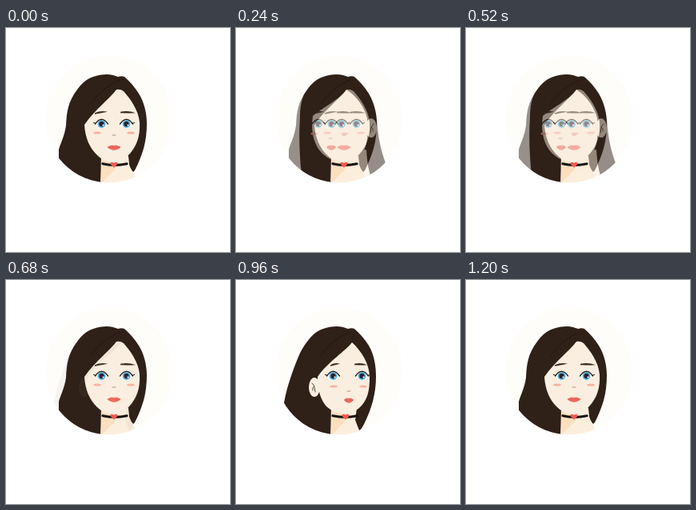
An HTML page with a canvas that plays this animation: 280x280 px, repeating every 1880 ms.

```html
<!DOCTYPE html>
<html lang="en">
<head>
<meta charset="utf-8">
<title>Looking around</title>
<style>
  html, body { margin: 0; width: 100%; height: 100%; overflow: hidden; background: #fff; }
  canvas { display: block; }
</style>
</head>
<body>
<canvas id="stage" width="280" height="280"></canvas>
<script>
const SIZE = 280, LOOP = 1880, STEP = 40;
const HAIR = '#2f2018', SKIN = '#f9eee0', BODY = '#fbeedd', PEACH = '#fbdfbf', RED = '#f4574d';

// Shared top of the hair, from the left temple to the right one.
const CROWN = 'M89 77C94 70 100 64 109 61C117 58 127 57 134 59L140 61C143 60 146 60 148 61C155 67 161 74 166 82';

const poses = {
  front: {
    hair: CROWN + 'C173 93 176 107 176 119C176 142 171 158 161 178L159 180Q153 174 153 162L120 165L118 200H66V152C68 144 73 136 75 122C76 105 77 93 89 77Z',
    body: 'M119 160H153L154 172L162 187L156 200H118Z',
    face: 'M138 77C130 88 112 101 98 121C99 138 105 150 113 158Q122 168 135 168Q146 168 154 158C163 148 168 136 167 118C166 103 155 88 147 79Q143 76 138 77Z',
    eyes: [119.5, 150.5], brows: [[111, 127], [143, 162]],
    blush: [114, 156], blushY: 131, nose: [135, 134], lips: [135, 149.5, 8.5], heart: 135
  },
  left: {
    hair: CROWN + 'C175 98 176 112 177 126C179 145 183 157 187 169V200H168L163 160L121 165L120 200H84C80 172 78 140 80 112C80 98 82 86 89 77Z',
    body: 'M119 160L163 152Q164 172 168 184L166 200H118Z',
    face: 'M138 77C130 89 106 101 96 110C93 131 98 147 108 157Q121 169 137 168Q152 166 159 155C165 145 165 130 164 113C161 100 152 86 138 77Z',
    eyes: [103, 132], brows: [[96, 110], [126, 145]],
    blush: [98, 136], blushY: 132, nose: [118, 138], lips: [119, 149.5, 6], heart: 135, ear: [169, 125, 1]
  },
  right: {
    hair: CROWN + 'C173 94 175 108 175 121C175 143 169 161 162 176Q157 187 154 188Q149 185 149 175L150 160L120 165L118 200H60V154C63 136 69 119 74 106C79 93 82 86 89 77Z',
    body: 'M119 160H151L149 175L154 188V200H118Z',
    face: 'M145 78C137 89 116 101 102 121C102 138 106 150 113 158Q124 168 136 167Q149 166 157 157C165 148 167 137 167 122C167 105 157 89 145 78Z',
    eyes: [121.5, 157.5], brows: [[118, 130], [148, 164]],
    blush: [122, 159], blushY: 133, nose: [141, 139], lips: [141, 150.5, 6], heart: 137, ear: [98, 134, -1]
  }
};

function fill(c, path, color) {
  c.fillStyle = color;
  c.fill(new Path2D(path));
}

function line(c, path, color, width) {
  c.strokeStyle = color;
  c.lineWidth = width;
  c.stroke(new Path2D(path));
}

function oval(c, x, y, rx, ry, color) {
  c.fillStyle = color;
  c.beginPath();
  c.ellipse(x, y, rx, ry, 0, 0, Math.PI * 2);
  c.fill();
}

function drawEye(c, x, side) {
  const y = 120;
  oval(c, x, y, 7.5, 4.8, '#fff');
  oval(c, x, y, 5, 4.9, '#58b8dc');
  oval(c, x, y, 3.1, 3.2, '#2a2033');
  oval(c, x + 2, y + 1.5, 1.1, 1.1, '#fff');
  line(c, `M${x - 8} ${y}Q${x} ${y - 11.5} ${x + 8} ${y}`, '#2e211f', 1.4);
  line(c, `M${x + side * 7.5} ${y - 0.5}l${side * 2.5} -1.2`, '#2e211f', 1.1);
}

function drawEar(c, [x, y, side]) {
  oval(c, x, y, 7, 12, SKIN);
  line(c, `M${x - side} ${y + 6}q${side} -10 ${side * 4} -11M${x} ${y - 1}q${side * 3} 1 ${side * 2} 5`, '#4a3931', 0.9);
}

function drawPose(c, p) {
  c.lineCap = 'round';
  fill(c, p.hair, HAIR);
  fill(c, p.body, BODY);
  fill(c, 'M120 162L140 167L136 177L119 194Z', PEACH);
  if (p.ear) drawEar(c, p.ear);
  fill(c, p.face, SKIN);
  line(c, 'M142 65Q118 76 106 95', '#21150f', 0.7);

  const h = p.heart;
  line(c, `M121 169.7Q${h} 173 151 169.8`, '#161111', 3.2);
  fill(c, `M${h} 174.5C${h - 8} 169 ${h - 3} 166 ${h} 169C${h + 3} 166 ${h + 8} 169 ${h} 174.5Z`, RED);

  p.eyes.forEach((x, i) => drawEye(c, x, i ? 1 : -1));
  p.brows.forEach(([a, b], i) => {
    const tilt = i ? 0.7 : -0.7, mid = (a + b) / 2;
    fill(c, `M${a} ${105.5 - tilt}Q${mid} 102.5 ${b} ${105.5 + tilt}Q${mid} 106.5 ${a} ${107 - tilt}Z`, '#3b2922');
  });
  p.blush.forEach(x => oval(c, x, p.blushY, 4.7, 1.5, '#f8b09f'));

  const [nx, ny] = p.nose;
  oval(c, nx, ny, 2.8, 1, '#c9bbae');
  const [x, y, w] = p.lips;
  fill(c, `M${x - w} ${y - 0.5}Q${x - 3} ${y - 4} ${x} ${y - 2.5}Q${x + 3} ${y - 4} ${x + w} ${y - 0.5}Q${x} ${y + 7} ${x - w} ${y - 0.5}Z`, '#ef6c60');
  line(c, `M${x - w + 1} ${y - 0.5}Q${x} ${y + 1} ${x + w - 1} ${y - 0.5}`, '#d9564c', 0.6);
}

// Each layer is opaque, so blending keeps overlapping areas solid.
function makeLayer(pose) {
  const layer = document.createElement('canvas');
  layer.width = layer.height = SIZE;
  const c = layer.getContext('2d');
  c.fillStyle = '#fff';
  c.fillRect(0, 0, SIZE, SIZE);
  c.beginPath();
  c.arc(128.8, 113.8, 79.5, 0, Math.PI * 2);
  c.fillStyle = '#fffdfa';
  c.fill();
  c.clip();
  drawPose(c, pose);
  return layer;
}

const front = makeLayer(poses.front);
const turns = [
  { layer: makeLayer(poses.left), begin: 80, peak: 400, end: 640 },
  { layer: makeLayer(poses.right), begin: 640, peak: 960, end: 1200 }
];
const ctx = document.getElementById('stage').getContext('2d');

// Eases from 0 at begin to 1 at peak and back to 0 at end.
function turnAmount(t, { begin, peak, end }) {
  if (t <= begin || t >= end) return 0;
  const k = t < peak ? (t - begin) / (peak - begin) : (end - t) / (end - peak);
  return (1 - Math.cos(Math.PI * k)) / 2;
}

function render(now) {
  const time = Math.floor((now % LOOP) / STEP) * STEP;
  ctx.globalAlpha = 1;
  ctx.drawImage(front, 0, 0);
  for (const turn of turns) {
    ctx.globalAlpha = turnAmount(time, turn);
    ctx.drawImage(turn.layer, 0, 0);
  }
}

const start = performance.now();
function tick() {
  render(performance.now() - start);
  requestAnimationFrame(tick);
}
tick();
</script>
</body>
</html>
```
